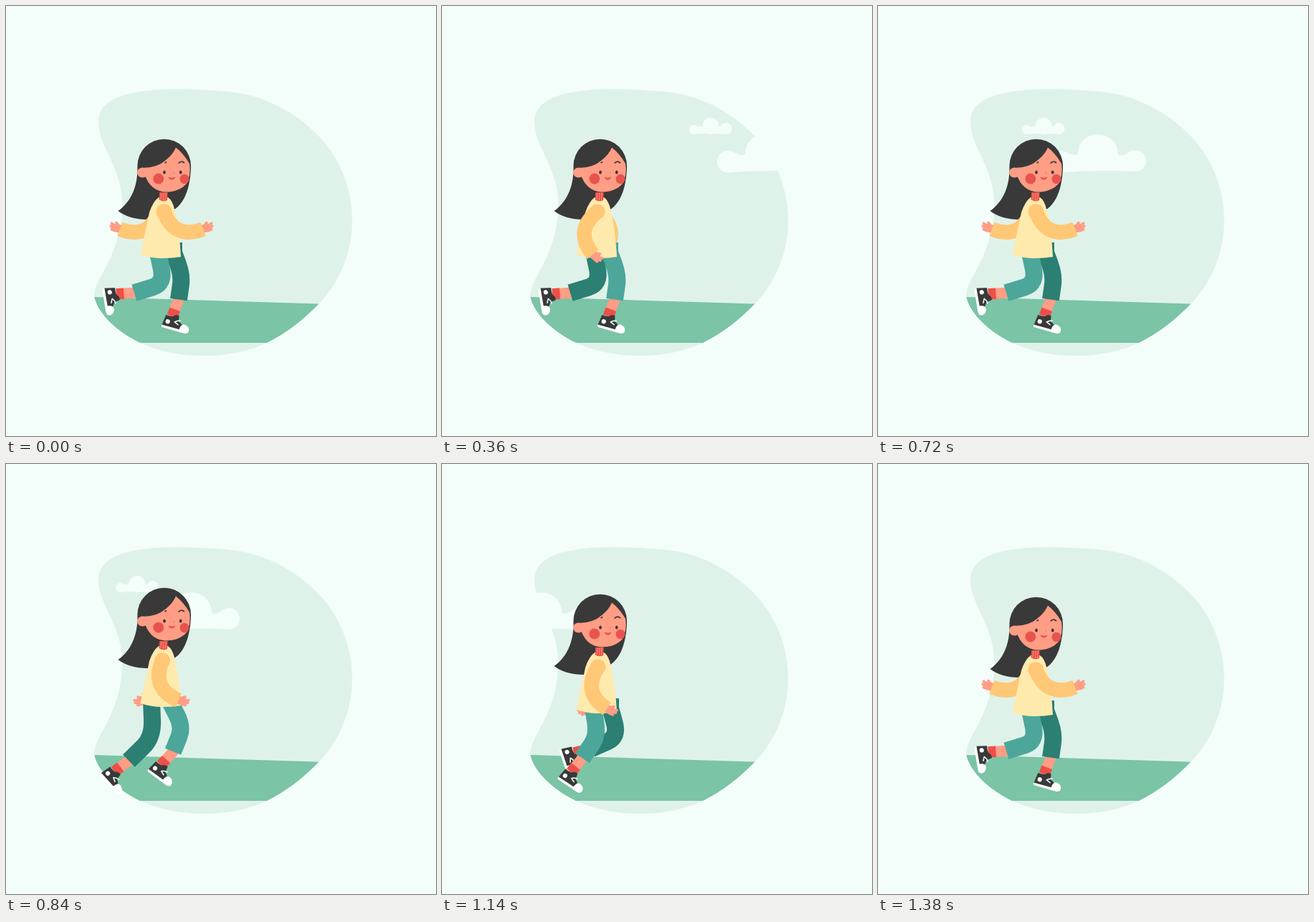
Recreate the animation shown at these times as an HTML page. Size 600 px wide and 600 px high, loop 1440 ms.

```html
<!DOCTYPE html>
<html lang="en">
<head>
<meta charset="utf-8">
<title>Walking girl</title>
<style>
  html, body { margin: 0; width: 100%; height: 100%; overflow: hidden; background: #f3fdfa; }
  svg { display: block; width: 100vw; height: 100vh; }
  .cloud { fill: #f3fdfa; }
  .skin { fill: #ff9d85; }
  .hair { fill: #393939; }
  .calf, .sock, .pants, .sleeve { fill: none; }
  .calf { stroke: #ff9d85; stroke-width: 15; }
  .sock { stroke: #ec5048; stroke-width: 15.5; }
  .pants { stroke-width: 24; stroke-linejoin: round; }
  .sleeve { stroke: #ffc876; stroke-width: 20.5; }
  .shoulder { fill: #ffc876; }
</style>
</head>
<body>
<svg viewBox="0 0 600 600" xmlns="http://www.w3.org/2000/svg">
  <defs>
    <path id="blob" d="M129 165C127 136 154 116 240 116Q272 116 305 119C360 123 402 147 436 181C466 212 483 255 483 300C483 350 460 393 436 416C415 438 392 456 364 470C340 481 310 488 278 488C244 488 213 482 187 470C150 452 126 425 123 404C123 380 159 350 162 285C165 228 131 200 129 165Z"/>
    <clipPath id="inside"><use href="#blob"/></clipPath>
    <g id="shoe">
      <path class="hair" d="M-9 0L-11.500 15L19 17Q18 8 10.500 5L9 -3Q4 -4 1 0Q-4 1 -9 0Z"/>
      <path fill="#fff" d="M-11.800 14.500L13.500 15.500Q14 7 20 7.500Q27 9 27 15Q26.500 19.500 21 19.500L-9 18Q-12 18 -11.800 14.500Z"/>
      <circle cx="-4.500" cy="8.500" r="3.100" fill="#fff"/>
      <path d="M5 7Q8 4 12.500 3.500M6 7.500L10.500 9.500" fill="none" stroke="#e6f3f0" stroke-width="1.700" stroke-linecap="round"/>
    </g>
    <g id="hand">
      <path class="skin" d="M-3 -6L4 -6Q9 -7 11 -3Q12 3 8 6L-3 5Z"/>
      <path d="M3 -4L7.500 -7M8 -2L13.500 -4M8 1L13.500 0M7 4L11 4" fill="none" stroke="#ff9d85" stroke-width="3.600" stroke-linecap="round"/>
    </g>
  </defs>

  <use href="#blob" fill="#dff2ea"/>
  <path d="M100 405.300L500 417.500V470H100Z" fill="#7bc4a6" clip-path="url(#inside)"/>

  <g id="smallCloud" class="cloud">
    <circle cx="6.500" cy="172.500" r="6.500"/>
    <circle cx="30" cy="167.500" r="11.500"/>
    <circle cx="51.500" cy="171" r="8"/>
    <path d="M6 168H52V179Q30 177 6 179Z"/>
  </g>
  <path id="bigCloud" class="cloud" d="M15.500 232.500A15.500 15.500 0 0 1 15.500 202C28 201 32 211 42 207C42 170 98 170 98 208C108 212 112 201 122 201A15 15 0 0 1 122 231Q70 228 15.500 232.500Z"/>

  <g class="body">
    <path class="hair" d="M183.500 225C184 255 172 275 156.500 286Q172 298 198 298L233 285C250 276 258 250 258 222Z"/>
  </g>
  <g class="body"><g id="farArm" transform="translate(434) scale(-1 1)"></g></g>
  <g id="farLeg"></g>
  <g id="nearLeg"></g>
  <g class="body">
    <path d="M213 267Q205 273 200 288Q195 312 187.500 347Q203 352 218 352Q232 352 244 350Q242 312 235 283Q232 271 226 267Z" fill="#ffeaae"/>
    <path d="M214.500 255H226L225 271Q219 274 213.500 270Z" fill="#ec5048"/>
    <path d="M217 260L216 270M220 260L219.500 271M223 260L222.500 271" stroke="#ff9d85" stroke-width=".8"/>
    <circle class="hair" cx="220.700" cy="223" r="37.300"/>
    <ellipse class="skin" cx="190.500" cy="232.500" rx="7.500" ry="7"/>
    <path class="skin" d="M190 226Q211 226 223 215Q233 207 237 197.500Q248 206 256 220Q258.500 236 252 248Q242 259.500 222 259.500Q203 258 195 239Z"/>
    <g fill="#e9534d">
      <circle cx="212.800" cy="241" r="7.400"/>
      <ellipse cx="249" cy="241.500" rx="6.500" ry="6.800"/>
      <path d="M226 238.800Q231 240 236.500 238.800Q235 242.500 231.500 242.500Q228 242.500 226 238.800Z"/>
    </g>
    <path d="M234 231.500Q236 233.500 233.500 234" fill="none" stroke="#ea7565"/>
    <g class="hair">
      <ellipse cx="221" cy="232" rx="1.900" ry="2.500"/>
      <ellipse cx="243.700" cy="232" rx="1.900" ry="2.500"/>
    </g>
    <path d="M240.500 219.500Q244.500 215 249 219M221.500 219L224 217.500" fill="none" stroke="#393939" stroke-width="1.700"/>
  </g>
  <g class="body" id="nearArm"></g>
</svg>

<script>
const LOOP = 1440, STEP = 60, STRIDE = 345, HOLD = .087;
const $ = id => document.getElementById(id);

// Smooth repeating curve through key values, without overshoot
function cycle(times, values) {
  const n = times.length;
  const time = i => times[(i + n) % n] + Math.floor(i / n);
  const value = i => values[(i + n) % n];
  const slope = i => (value(i + 1) - value(i)) / (time(i + 1) - time(i));
  const tangent = i => {
    const a = slope(i - 1), b = slope(i);
    return a * b <= 0 ? 0 : 2 * a * b / (a + b);
  };
  return phase => {
    const p = phase % 1;
    const i = times.filter(t => t <= p).length - 1;
    const h = time(i + 1) - time(i), s = (p - time(i)) / h;
    return value(i) + (value(i + 1) - value(i)) * s * s * (3 - 2 * s)
      + h * s * (1 - s) * ((1 - s) * tangent(i) - s * tangent(i + 1));
  };
}

// A stride has four beats: plant, pass, push, reach. A cycle is two strides.
const beats = [0, .238, .332, .762];
const steps = [...beats, ...beats.map(b => b + 1)].map(b => b / 2);
const rise = cycle(beats, [0, -4, -13, -9]);
const swing = cycle(steps, [66, 45, 30, -29, -6, 12, 28, 60]);
const footX = cycle(steps, [232, 180, 151, 160, 154, 184, 212, 236]);
const footY = cycle(steps, [433, 430, 429, 429, 402, 403, 417, 434]);
const footTurn = cycle(steps, [13, 31, 45, 47, 78, 69, 39, 10]);
const hipX = cycle(steps, [234, 211, 203, 209, 212, 235, 231, 226]);

function build(id, html) {
  $(id).innerHTML = html;
  return [...$(id).children];
}
const legHtml = color => `<path class="calf"/><path class="sock"/><use href="#shoe"/><path class="pants" stroke="${color}"/>`;
const armHtml = '<use href="#hand"/><circle class="shoulder" r="10.800"/><path class="sleeve"/>';
const farLeg = build('farLeg', legHtml('#2c7f73'));
const nearLeg = build('nearLeg', legHtml('#4da69a'));
const arms = ['farArm', 'nearArm'].map(id => build(id, armHtml));
const bodies = document.querySelectorAll('.body');

const mix = (a, b, k) => [a[0] + (b[0] - a[0]) * k, a[1] + (b[1] - a[1]) * k];
// Point at a distance from another; 0 degrees is down, positive is to the right
const reach = ([x, y], deg, dist) => {
  const a = deg * Math.PI / 180;
  return [x + Math.sin(a) * dist, y + Math.cos(a) * dist];
};
const place = (el, [x, y], turn = 0) => el.setAttribute('transform', `translate(${x} ${y}) rotate(${turn})`);
const trace = (el, d) => el.setAttribute('d', d);

// The more the foot tips, the more the knee bends.
function drawLeg([calf, sock, shoe, pants], p, dy) {
  const turn = footTurn(p);
  const hip = [hipX(p), 344 + dy * .75];
  const ankle = [footX(p), footY(p)];
  const cuff = reach(ankle, 172 - turn, 25);
  const lean = Math.atan2(cuff[0] - hip[0], cuff[1] - hip[1]) * 180 / Math.PI;
  const knee = reach(mix(hip, cuff, .5), lean + 90, 4 + turn / 3);
  trace(calf, `M${mix(cuff, ankle, -.1)}L${ankle}`);
  trace(sock, `M${mix(ankle, cuff, .42)}L${ankle}`);
  place(shoe, ankle, turn);
  trace(pants, `M${hip[0]} ${hip[1] - 14}L${hip}L${mix(hip, knee, .5)}Q${knee} ${mix(knee, cuff, .4)}L${cuff}`);
}

function drawArm([hand, shoulder, sleeve], angle) {
  const top = [217 + angle * .05, 287];
  const wrist = reach(top, angle, 60);
  const elbow = reach(mix(top, wrist, .5), angle - 90, 30);
  place(hand, wrist, 34 - angle * .8);
  place(shoulder, top);
  trace(sleeve, `M${top}Q${elbow} ${wrist}`);
}

function draw(time) {
  const t = Math.floor(time % LOOP / STEP) * STEP;
  const count = Math.floor(t / STRIDE);
  const u = Math.max(0, (t / STRIDE - count - HOLD) / (1 - HOLD));
  const p = (count + u) / 2;
  const dy = rise(u);
  place($('smallCloud'), [489 - t * .4, 0]);
  place($('bigCloud'), [525 - t * .4, 0]);
  bodies.forEach(el => {
    if (el.id !== 'nearArm') place(el, [0, dy]);
  });
  place($('nearArm'), [0, dy]);
  drawLeg(farLeg, p, dy);
  drawLeg(nearLeg, p + .5, dy);
  arms.forEach(arm => drawArm(arm, swing(p)));
}

const start = performance.now();
function tick() {
  draw(performance.now() - start);
  requestAnimationFrame(tick);
}
tick();
</script>
</body>
</html>
```
